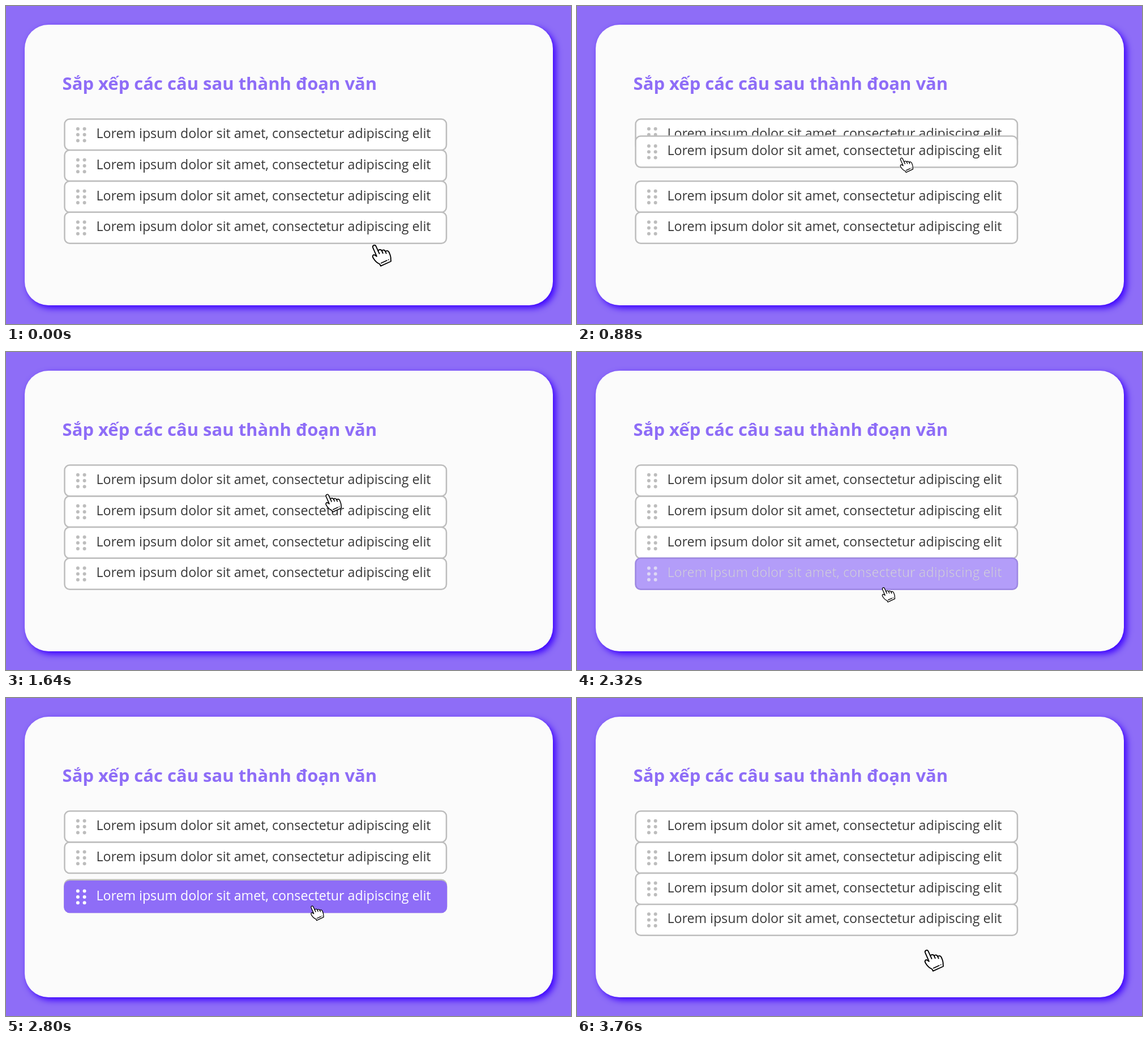
An HTML page that plays this animation: 998 by 561 pixels, repeating every 4160 ms.

```html
<!DOCTYPE html>
<html lang="vi">
<head>
<meta charset="utf-8">
<title>Sắp xếp câu</title>
<style>
  html, body { margin: 0; width: 100%; height: 100%; overflow: hidden; background: #8e6df7; }
  .card {
    position: absolute; left: 33px; top: 33px; width: 933px; height: 495px;
    border-radius: 42px; background: #fbfbfb; box-shadow: 5px 5px 12px #3b00ff;
  }
  svg { position: absolute; left: 0; top: 0; font-family: "Open Sans", sans-serif; }
  .title { font-size: 31px; font-weight: 700; fill: #8e6df7; }
  .label { font-size: 23.2px; }
  .hand { fill: #fff; stroke: #000; stroke-width: 1.9; stroke-linecap: round; stroke-linejoin: round; }
</style>
</head>
<body>
<div class="card"></div>
<svg width="998" height="561" viewBox="0 0 998 561">
  <text class="title" x="99.6" y="147.5">Sắp xếp các câu sau thành đoạn văn</text>
  <g id="rows"></g>
  <g id="hand" class="hand">
    <path d="M-16-14.4C-17.2-17.8-12.4-20.6-10.6-16.8L-6.8-8.6C-5.4-11.6-1.2-11.4 0-8.4C1.5-11 5.2-10.6 6.2-7.3C8-9.5 11.4-9 12.6-6C14.4-2 16 1 15.6 5.4L15.9 10L-2 18.2L-4 14.6C-8.4 13-12.4 9-15.4 4C-17.8 0-15-2.6-12-.8L-9.2 1.2Z"/>
    <path fill="none" d="M-6.8-8.6L-4.5-3.6M0-8.4L1.7-4.4M6.2-7.3L7.6-4M-1.2 13L8.6 8.5M11.6 7.1h.1"/>
  </g>
</svg>
<script>
const LOOP = 4160, STEP = 40, PITCH = 54.8;
const PURPLE = '#8e6df7', GREY = '#bdbdbd';
const TEXT = 'Lorem ipsum dolor sit amet, consectetur adipiscing elit';

const linear = x => x;
const smooth = x => x * x * (3 - 2 * x);

// Keys are [start, end, value reached]; the value holds between them.
function track(t, from, keys, ease = linear) {
  let value = from;
  for (const [start, end, to] of keys) {
    if (t <= start) break;
    value += (to - value) * ease(Math.min(1, (t - start) / (end - start)));
  }
  return value;
}

function add(parent, tag, attrs, text) {
  const el = document.createElementNS('http://www.w3.org/2000/svg', tag);
  for (const name in attrs) el.setAttribute(name, attrs[name]);
  if (text) el.textContent = text;
  return parent.appendChild(el);
}

// Box, grip and label of one row, each in its own layer.
function face(parent, fill, line, dot, ink) {
  const box = add(parent, 'rect', {
    x: 103.5, y: 199.4, width: 674.4, height: 54.9, rx: 9,
    fill, stroke: line, 'stroke-width': 2.5
  });
  const grip = add(parent, 'g', { fill: dot });
  for (let i = 0; i < 6; i++) {
    add(grip, 'circle', { cx: 126.9 + i % 2 * 11.7, cy: 216.8 + (i >> 1) * 10.3, r: 3 });
  }
  const label = add(parent, 'text', { class: 'label', x: 159.4, y: 233, fill: ink }, TEXT);
  return [box, grip, label];
}

const list = document.getElementById('rows');
const hand = document.getElementById('hand');
const rows = [0, 1, 2, 3].map(() => {
  const row = add(list, 'g', {});
  face(row, '#fff', GREY, GREY, '#383838');
  return row;
});
const active = face(rows[3], PURPLE, PURPLE, '#fff', '#fff');

const shifts = [[880, 1280, 1], [600, 1200, -1], [2680, 3080, 1], [2400, 3000, -1]];
const fade = [[2160, 2400, 1], [3400, 3640, 0]];
const press = [[360, 440, .69], [1600, 1680, 1], [2160, 2240, .69], [3400, 3480, 1]];
const path = [
  [0, 360, 584, 309.5],
  [600, 1140, 581, 254.5],
  [1600, 2160, 550.5, 428.5],
  [2320, 2860, 550, 373.7],
  [3400, 3760, 631, 463.5]
];
const pathX = path.map(([a, b, x]) => [a, b, x]);
const pathY = path.map(([a, b, , y]) => [a, b, y]);

function draw(t) {
  rows.forEach((row, i) => {
    const y = (i + track(t, 0, [shifts[i]], smooth)) * PITCH;
    row.setAttribute('transform', `translate(0 ${y})`);
  });
  const alpha = track(t, 0, fade);
  for (const layer of active) layer.setAttribute('opacity', alpha);

  const x = track(t, 664, pathX), y = track(t, 440.5, pathY);
  hand.setAttribute('transform', `translate(${x} ${y}) scale(${track(t, 1, press)})`);
}

const begin = performance.now();
function tick() {
  const t = (performance.now() - begin) % LOOP;
  draw(Math.floor(t / STEP) * STEP);
  requestAnimationFrame(tick);
}
draw(0);
requestAnimationFrame(tick);
</script>
</body>
</html>
```
